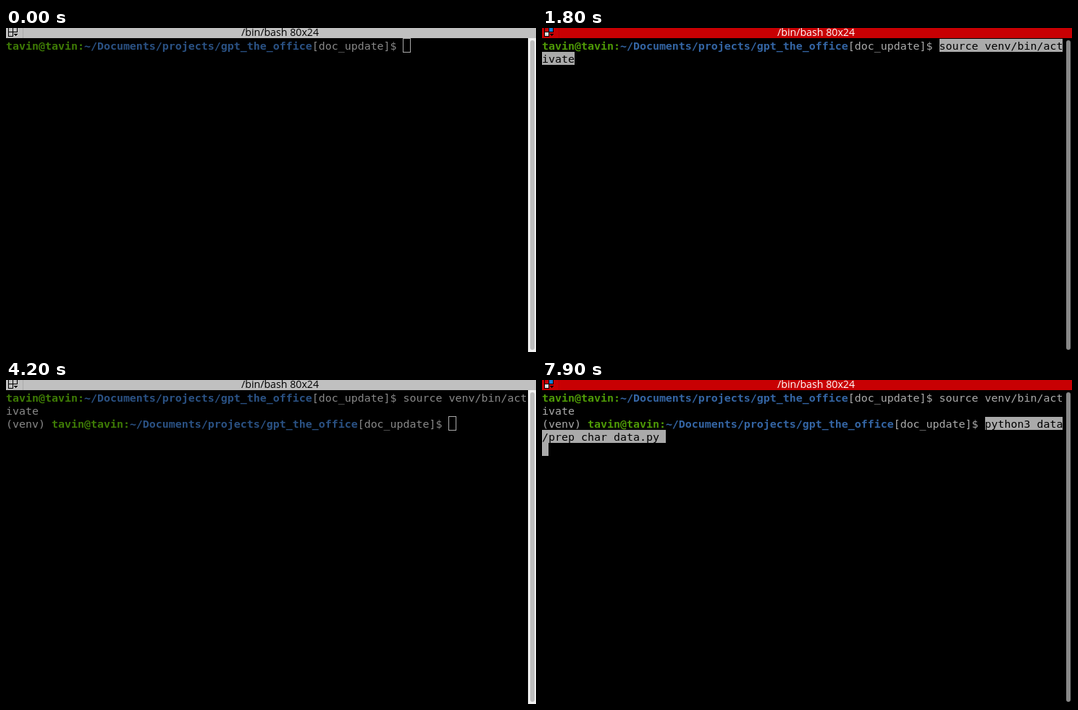
An HTML page for the animation above (8000 ms loop, 732 by 448 pixels).

```html
<!DOCTYPE html>
<html lang="en">
<head>
<meta charset="utf-8">
<title>Terminal</title>
<style>
html, body { margin: 0; width: 100%; height: 100%; overflow: hidden; background: #000; }

#stage {
  position: relative; width: 732px; height: 448px; overflow: hidden; background: #000;
  animation: focus 8s step-end infinite;
}
#stage * { animation-duration: 8s; animation-timing-function: step-end; animation-iteration-count: infinite; }

/* Window focus: everything that is coloured by it reads these variables. */
@keyframes focus {
  0%, 50% {
    --bar: #c0c0c0; --title: #000; --line: #aaa; --pane-a: #c0c0c0; --pane-b: #c0c0c0;
    --fg: #888; --user: #3e7b05; --path: #2a5183; --fill: transparent; --ring: #aaa;
  }
  7.5%, 82.5% {
    --bar: #c80003; --title: #fff; --line: #b40003; --pane-a: #0f7fd8; --pane-b: #ddd;
    --fg: #aaa; --user: #4e9a06; --path: #3465a4; --fill: #aaa; --ring: transparent;
  }
}

#bar { position: absolute; inset: 0 0 auto; height: 14px; background: var(--bar); }
#title {
  position: absolute; left: 325px; top: -4px; white-space: pre;
  font: 14.2px/20px "Open Sans", "Noto Sans", sans-serif; color: var(--title);
}
#icon { position: absolute; left: 0; top: 0; }

pre {
  position: absolute; left: 0; top: 16px; margin: 0;
  font: 14.95px/18px "DejaVu Sans Mono", monospace; color: var(--fg);
}
pre b { color: var(--user); }
pre b + b { color: var(--path); }
/* The highlight fills the cell, which begins one pixel above the text row. */
.cmd { display: inline-block; position: relative; top: -1px; height: 18px; line-height: 20px; vertical-align: top; }
.first { animation-name: first; }
.second { animation-name: second; background: #aaa; color: #000; }
.reply { animation-name: reply; }

@keyframes first {
  0% { visibility: hidden; background: #aaa; color: #000; }
  18.75% { visibility: visible; background: #aaa; color: #000; }
  30%, 100% { visibility: visible; background: transparent; color: var(--fg); }
}
@keyframes reply { 0% { visibility: hidden; } 30%, 100% { visibility: visible; } }
@keyframes second { 0% { visibility: hidden; } 98.75%, 100% { visibility: visible; } }

#cursor {
  position: absolute; left: 0; top: 15px; width: 9px; height: 18px;
  background: var(--fill); box-shadow: 0 0 0 1px var(--ring);
  animation-name: place, blink;
}
@keyframes place {
  0% { transform: translate(549px, 0); }
  18.75% { transform: translate(0, 36px); }
  30% { transform: translate(612px, 36px); }
  98.75%, 100% { transform: translate(0, 72px); }
}
@keyframes blink {
  0%, 30%, 45%, 92.5%, 100% { opacity: 1; }
  22.5%, 37.5%, 90% { opacity: 0; }
}

#track { position: absolute; left: 721px; top: 14px; width: 11px; height: 434px; animation-name: track; }
#thumb { position: absolute; left: 3px; top: 3px; width: 6px; height: 428px; border-radius: 3px; animation-name: thumb; }
@keyframes track {
  0%, 52.5%, 82.5% { background: #f0f0f0; }
  7.5%, 83.75% { background: #747474; }
  8.75%, 85% { background: #343434; }
  10%, 86.25% { background: #0e0e0e; }
  11.25%, 87.5%, 100% { background: #000; }
  50% { background: #747474; }
  51.25% { background: #c4c4c4; }
}
@keyframes thumb {
  0%, 52.5% { background: #bdbdbd; }
  7.5%, 82.5%, 100% { background: #888; }
  50% { background: #9c9c9c; }
  51.25% { background: #b0b0b0; }
}
</style>
</head>
<body>
<div id="stage">
  <div id="bar">
    <svg id="icon" width="25" height="14" shape-rendering="crispEdges">
      <path d="M23.5 0V14" stroke="var(--line)"/>
      <g stroke="#000">
        <path d="M3.5 -.5h6v6h-6z" fill="none"/>
        <path d="M9.5 -.5h6v6h-6z" fill="var(--pane-a)"/>
        <path d="M3.5 5.5h6v6h-6z" fill="var(--pane-b)"/>
      </g>
      <path d="M11 8h5l-2.5 3z"/>
    </svg>
    <div id="title">/bin/bash 80x24</div>
  </div>
  <div id="cursor"></div>
  <pre><b>tavin@tavin:</b><b>~/Documents/projects/gpt_the_office</b>[doc_update]$ <span class="cmd first">source venv/bin/act</span>
<span class="cmd first">ivate</span>
<span class="reply">(venv) <b>tavin@tavin:</b><b>~/Documents/projects/gpt_the_office</b>[doc_update]$ </span><span class="cmd second">python3 data</span>
<span class="cmd second">/prep_char_data.py </span></pre>
  <div id="track"><div id="thumb"></div></div>
</div>
</body>
</html>
```
